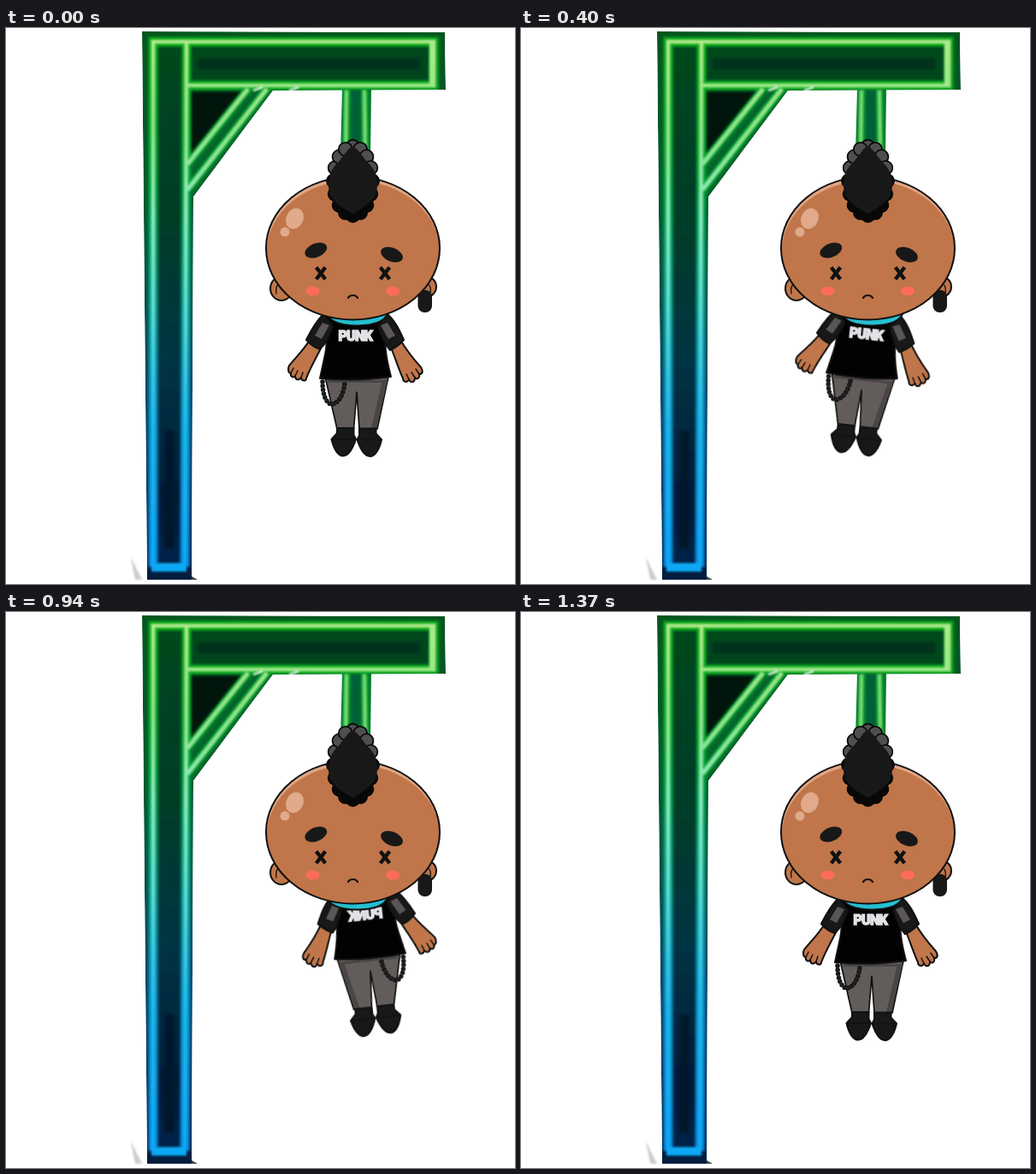
An HTML page for the animation above (1.48 s loop, 595 px wide and 649 px high).

```html
<!DOCTYPE html>
<html lang="en">
<head>
<meta charset="utf-8">
<title>Hanging doll</title>
<style>
  html, body { margin: 0; width: 100%; height: 100%; overflow: hidden; background: #fff; }
  svg { display: block; width: 100%; height: 100%; }
  .ink { stroke: #111; stroke-width: 2; stroke-linejoin: round; stroke-linecap: round; }
  .skin { fill: #c0764a; }
  .dark { fill: #181818; }
  .line { fill: none; }
  .soft { filter: url(#soft); }
  .fuzzy { filter: url(#fuzzy); }
  .label { font: 900 16px Roboto, "Liberation Sans", sans-serif; letter-spacing: -.8px;
           fill: #e2e2e6; stroke: #e2e2e6; stroke-width: 1.4; }
  #body { transform-origin: 424px 314px; animation: swing 1480ms step-end infinite; }
  @keyframes swing {
    0%, 45.27%, 81.757%, 100% { transform: none; }
    27.027% { transform: rotate(6.2deg); }
    63.514% { transform: translate(-24px, -4px) scaleX(-1) rotate(6.2deg); }
  }
</style>
</head>
<body>
<svg viewBox="0 0 595 649">
  <defs>
    <linearGradient id="wood" gradientUnits="userSpaceOnUse" x1="0" y1="0" x2="0" y2="649">
      <stop offset="0" stop-color="#04561f"/><stop offset=".3" stop-color="#045a2c"/>
      <stop offset=".5" stop-color="#044e4c"/><stop offset=".75" stop-color="#053c68"/>
      <stop offset="1" stop-color="#041a3c"/>
    </linearGradient>
    <linearGradient id="glow" gradientUnits="userSpaceOnUse" x1="0" y1="0" x2="0" y2="649">
      <stop offset="0" stop-color="#0cae14"/><stop offset=".28" stop-color="#06a63c"/>
      <stop offset=".48" stop-color="#08a084"/><stop offset=".65" stop-color="#0890bc"/>
      <stop offset="1" stop-color="#0888e0"/>
    </linearGradient>
    <linearGradient id="core" gradientUnits="userSpaceOnUse" x1="0" y1="0" x2="0" y2="649">
      <stop offset="0" stop-color="#b4ea8c"/><stop offset=".18" stop-color="#90e486"/>
      <stop offset=".33" stop-color="#8ce8c0"/><stop offset=".5" stop-color="#60dcd4"/>
      <stop offset=".72" stop-color="#1cb8ec"/><stop offset="1" stop-color="#0aa6f6"/>
    </linearGradient>
    <linearGradient id="hollow" gradientUnits="userSpaceOnUse" x1="0" y1="0" x2="0" y2="649">
      <stop offset="0" stop-color="#05481c"/><stop offset=".35" stop-color="#043c28"/>
      <stop offset=".6" stop-color="#043444"/><stop offset=".85" stop-color="#041c38"/>
      <stop offset="1" stop-color="#052450"/>
    </linearGradient>
    <filter id="soft" filterUnits="userSpaceOnUse" x="100" y="-20" width="460" height="700">
      <feGaussianBlur stdDeviation=".8"/>
    </filter>
    <filter id="fuzzy" filterUnits="userSpaceOnUse" x="100" y="-20" width="460" height="700">
      <feGaussianBlur stdDeviation="1.7"/>
    </filter>
    <path id="frame" d="M159 4 513 5 514 72 312 73 219 197 217 644 165 644Z"/>
    <path id="tubes" d="M172 629V16H500V67H212M211 18 209 629"/>
    <path id="brace" d="M283 71 212 159M305 71 212 189"/>
    <path id="cross" d="M-4-5.2 4 5.2M4-5.2-4 5.2"/>
    <clipPath id="frameClip"><use href="#frame"/></clipPath>
    <clipPath id="headClip"><ellipse cx="405.5" cy="257" rx="102" ry="83.5"/></clipPath>
  </defs>

  <!-- gallows -->
  <path class="soft" d="M146 618 159 644H151Z" fill="#ccc"/>
  <path d="M217 640 224 644H217Z" fill="#444"/>
  <g clip-path="url(#frameClip)">
    <use href="#frame" fill="url(#wood)"/>
    <path d="M275 72H312L217 197 212 155Z" fill="#076a2a"/>
    <g class="fuzzy" fill="url(#hollow)">
      <path d="M177 22H207L205 623H176Z"/>
      <path d="M216 22H494V62H216Z"/>
    </g>
    <path class="fuzzy" d="M224 36H484V48H224Z" fill="#04301c"/>
    <path class="fuzzy" d="M187 470H196V608H185Z" fill="#04122c"/>
    <path class="fuzzy" d="M216 74H276L216 150Z" fill="#03180f"/>
    <g class="line fuzzy">
      <use href="#tubes" stroke="url(#glow)" stroke-width="11"/>
      <use href="#brace" stroke="#0ca634" stroke-width="9"/>
      <path d="M294 74 217 172" stroke="#05602a" stroke-width="4"/>
    </g>
    <g class="line soft" stroke="url(#core)">
      <use href="#tubes" stroke-width="4.6"/>
      <use href="#brace" stroke-width="5"/>
      <path d="M498.5 16V67" stroke-width="7"/>
      <path d="M170 629.5H211" stroke-width="10"/>
    </g>
  </g>
  <path class="line soft" d="M289 73 300 69M331 73 342 69" stroke="#fff" stroke-width="2"/>

  <!-- rope -->
  <path d="M393 72H427L426 148H391Z" fill="#067a2c"/>
  <g class="line soft">
    <path d="M409 73V148" stroke="#056038" stroke-width="11"/>
    <path d="M398 72 397 148M419 72 420 148" stroke="#18b43a" stroke-width="7"/>
    <path d="M398 73 397 148M419 73 420 148" stroke="#80dc7c" stroke-width="3"/>
  </g>

  <!-- swinging body -->
  <g id="body">
    <g class="ink">
      <path class="skin" d="M355 364C348 376 338 385 331 394C329 398 330 403 333 403C332 407 336 409 338 406C338 411 342 412 345 408C345 412 351 413 351 409C355 398 361 388 368 374Z"/>
      <path class="skin" d="M461 364C468 376 476 386 485 396C488 401 487 404 483 404C484 409 480 411 478 408C478 414 473 415 471 410C469 415 464 413 464 409C459 398 456 388 450 373Z"/>
      <path class="line" d="M333 403 336 397M338 406 341 400M345 408 347 402M483 404 479 398M478 408 474 402M471 410 468 404" stroke-width="1.5"/>
      <path d="M373 407 387 468H406.5L410 425 413 468H434L447 407Z" fill="#625d5b" stroke-width="1.7"/>
    </g>
    <path d="M440 411H446L433 467H427Z" fill="#4a4645"/>
    <path d="M377 411H443V414H376Z" fill="#4a4645"/>
    <g class="ink" stroke-width="1.6">
      <path id="shoe" class="dark" d="M387 467H406.5V475L409 480C405 492 400 499.5 394 499.5C388 499.5 383 491 380.5 480L387 473Z"/>
      <use href="#shoe" transform="matrix(-1 0 0 1 819.5 .5)"/>
      <path class="line" d="M381 480H408M412 480.5H439" stroke-width="1.3"/>
      <path d="M369 334C375 350 377 366 372 386L367 409Q408 413 450 407C445 388 440 368 446 334Z" fill="#020202"/>
      <path class="dark" d="M371 334C362 343 356 354 351 364Q358 372 367 375C374 368 379 359 382 348Z"/>
      <path class="dark" d="M446 334C455 342 460 353 465 364Q458 372 449 376C442 368 438 359 435 348Z"/>
    </g>
    <path d="M370 344 378 347 369 363 361 359ZM446 344 438 347 447 363 455 359Z" fill="#5a5655"/>
    <path class="line" d="M370 413C370 427 374 438 380 439C389 440 396 424 396 413"
          stroke="#111" stroke-width="5.5" stroke-linecap="round" stroke-dasharray="0 4.6"/>
    <path class="line" d="M370 413C370 427 374 438 380 439C389 440 396 424 396 413" stroke="#222" stroke-width="2"/>
    <text class="label" x="388.5" y="365">PUNK</text>
  </g>
  <path class="ink" d="M376 334Q380 347 411 347.5Q440 347 446 334Z" fill="#24bfd0"/>

  <!-- head -->
  <g class="ink">
    <ellipse class="skin" cx="322" cy="304" rx="13" ry="14"/>
    <ellipse class="skin" cx="491" cy="302" rx="12" ry="12"/>
    <path class="line" d="M316 310Q314 300 322 297M496 309Q498 301 491 297" stroke-width="1.3"/>
  </g>
  <rect class="dark" x="481.5" y="306" width="16.5" height="26" rx="7.5"/>
  <g clip-path="url(#headClip)">
    <ellipse cx="405.5" cy="257" rx="102" ry="83.5" fill="#e0a582"/>
    <ellipse class="skin" cx="406" cy="260.5" rx="101" ry="82.5"/>
  </g>
  <ellipse class="ink line" cx="405.5" cy="257" rx="101.5" ry="83.5"/>
  <g fill="#e0aa8b">
    <ellipse cx="337.5" cy="222.5" rx="10" ry="12.5" transform="rotate(25 337.5 222.5)"/>
    <circle cx="326" cy="238" r="5.5"/>
  </g>
  <g class="dark">
    <ellipse cx="362.3" cy="259.5" rx="13.5" ry="8" transform="rotate(-22 362.3 259.5)"/>
    <ellipse cx="451" cy="264.5" rx="13.5" ry="8" transform="rotate(22 451 264.5)"/>
  </g>
  <g fill="#ff6b5b">
    <ellipse cx="358.5" cy="307" rx="8" ry="5.2"/>
    <ellipse cx="452" cy="307" rx="8" ry="5.2"/>
  </g>
  <g class="line" stroke="#111" stroke-width="4.4" stroke-linecap="square">
    <use href="#cross" x="368" y="286.3"/>
    <use href="#cross" x="443" y="286.3"/>
    <path d="M400 315C402 311 409 311 411 315" stroke-width="2.2" stroke-linecap="round"/>
  </g>

  <!-- mohawk -->
  <g id="curls" stroke="#080808" stroke-width="1.8"></g>
  <path class="dark" d="M405 138C412 140 417 152 425 159C434 168 437 184 431 197C424 206 415 211 405 217C396 211 386 206 380 197C374 184 377 168 386 159C394 152 399 140 405 138Z"/>
</svg>
<script>
  const curls = document.getElementById("curls");
  const count = 16;
  for (let i = 0; i < count; i++) {
    const a = i / count * 2 * Math.PI;
    const curl = document.createElementNS("http://www.w3.org/2000/svg", "circle");
    const cy = 178.5 - 40 * Math.cos(a);
    curl.setAttribute("cx", 405.5 + 22.5 * Math.sin(a));
    curl.setAttribute("cy", cy);
    curl.setAttribute("r", 8);
    curl.setAttribute("fill", cy < 168 ? "#4f4f4f" : "#080808");
    curls.append(curl);
  }
</script>
</body>
</html>
```
